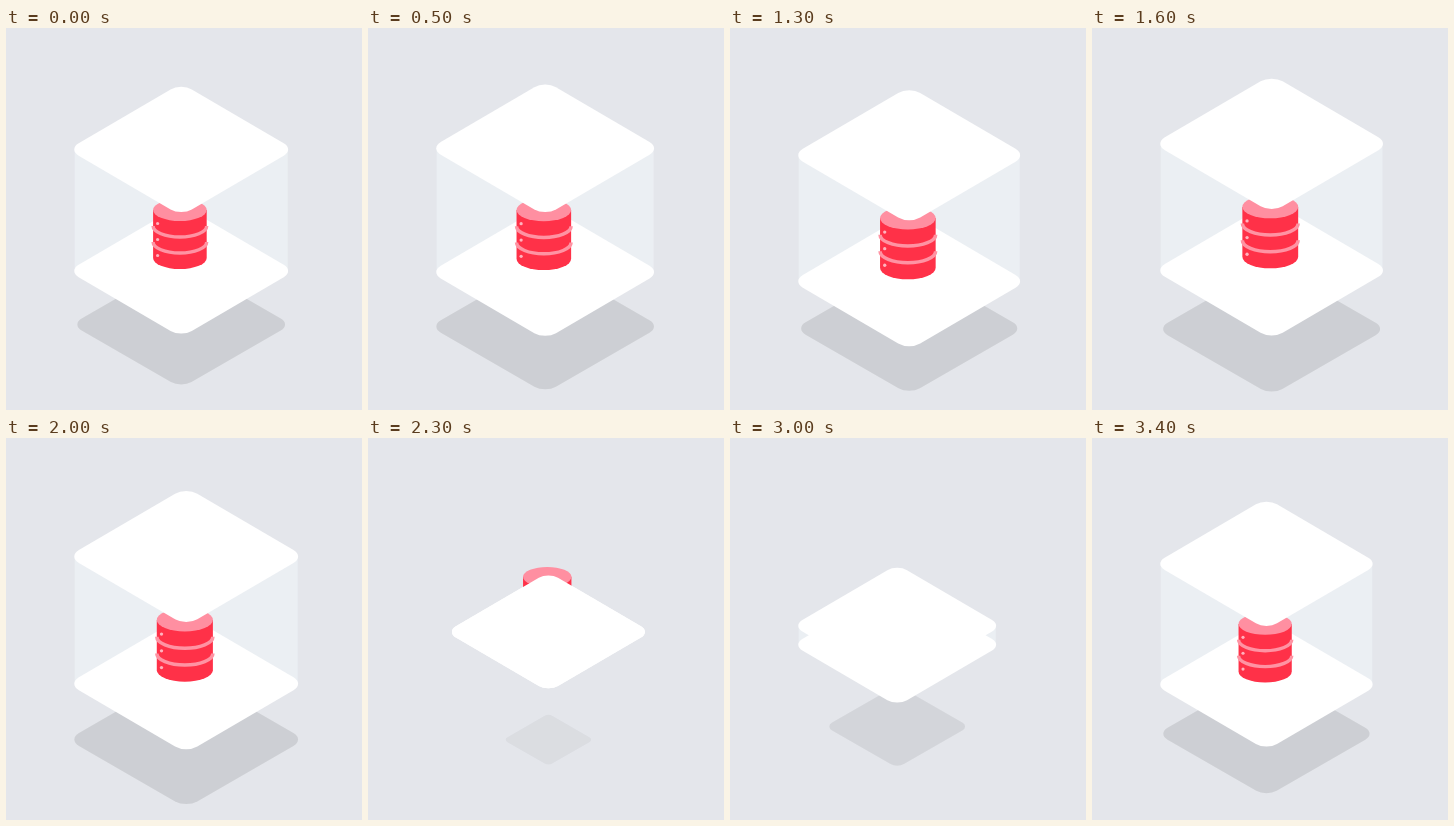
Animation of 356 by 382 pixels, one loop 3500 ms. Source, as an HTML page:

```html
<!DOCTYPE html>
<html lang="en">
<head>
<meta charset="utf-8">
<title>Data cube</title>
<style>
  html, body { margin: 0; width: 100%; height: 100%; overflow: hidden; background: #e4e6eb; }
  svg { display: block; width: 100%; height: 100%; }
</style>
</head>
<body>
<svg viewBox="0 0 356 382">
  <defs>
    <!-- rounded square, 214 wide once turned by 45 degrees -->
    <rect id="tile" x="-80" y="-80" width="160" height="160" rx="15" transform="rotate(45)"/>
  </defs>
  <g id="shadow"><use href="#tile" transform="scale(1 .577)"/></g>
  <g id="cube">
    <rect id="glass" x="-106.5" width="213" fill="#ebeff3"/>
    <g id="lower">
      <use href="#tile" transform="scale(1 .585)" fill="#fff"/>
      <g id="drum" transform="translate(-1.3 0)"></g>
    </g>
    <g id="upper"><use href="#tile" transform="scale(1 .585)" fill="#fff"/></g>
  </g>
</svg>
<script>
const LOOP = 3500, STEP = 100, BORN = 2700;
const WIDTH = 214, LEFT = 68.2;
// camera width over time, counted from the moment the cube is born
const ZOOM = [[2700, 180], [3000, 198], [3400, 212.5], [3500, 214], [4100, 218.7],
              [4400, 220.5], [4800, 222], [5500, 224], [6200, 225]];

const el = id => document.getElementById(id);
const put = (id, x, y, k = 1) => el(id).setAttribute('transform', `translate(${x} ${y}) scale(${k})`);
const part = (t, from, to) => Math.min(1, Math.max(0, (t - from) / (to - from)));
const smooth = p => p * p * (3 - 2 * p);
const easeOut = p => 1 - (1 - p) ** 2;
const wave = (t, peak) => Math.cos((t - peak) / 1500 * 2 * Math.PI);

function track(keys, t) {
  const i = Math.max(1, keys.findIndex(k => k[0] >= t));
  const [a, b] = [keys[i - 1], keys[i]];
  return a[1] + (b[1] - a[1]) * part(t, a[0], b[0]);
}

function buildDrum() {
  const rx = 26.8, ry = 11, foot = -13, pitch = 16, top = foot - 3 * pitch;
  const rim = y => `M${-rx} ${y}A${rx} ${ry} 0 0 0 ${rx} ${y}`;
  let out = `<path d="${rim(foot)}V${top}H${-rx}Z" fill="#ff3148"/>
    <ellipse cy="${top}" rx="${rx}" ry="${ry}" fill="#ff8fa1"/>`;
  for (let i = 0; i < 3; i++) {
    const y = foot - i * pitch;
    if (i) out += `<path d="${rim(y)}" fill="none" stroke="#ff93a3" stroke-width="3.4"/>`;
    out += `<circle cx="-22.3" cy="${y - 2.5}" r="1.6" fill="#ffb3be"/>`;
  }
  el('drum').innerHTML = out;
}

function draw(t) {
  const u = t < BORN ? t + LOOP : t;
  const opening = t >= BORN;
  const w = track(ZOOM, u), zoom = w / WIDTH, cx = LEFT + w / 2;

  const size = opening ? easeOut(part(t, 2700, 3000)) : 1 - part(t, 2050, 2600) ** 2.5;
  const open = opening ? smooth(part(t, 2880, 3340)) : 1 - smooth(part(t, 2000, 2300));
  const cast = opening ? easeOut(part(t, 2800, 3250)) : 1 - part(t, 2000, 2400) ** 1.66;

  const cy = 187.2 + 10 * wave(u - LOOP, 1000);
  const half = 0.568 * WIDTH * open / 2;
  put('cube', cx, cy, zoom * size);
  put('upper', 0, -half);
  put('lower', 0, half);
  el('glass').setAttribute('y', -half);
  el('glass').setAttribute('height', 2 * half);

  const breath = 0.988 + 0.017 * wave(u - LOOP, 700);
  put('shadow', cx, 296.5 + (w - WIDTH) / 2, zoom * cast * breath);
  el('shadow').setAttribute('opacity', 0.095 * cast);
}

buildDrum();
const start = performance.now();
function tick() {
  const t = (performance.now() - start) % LOOP;
  draw(Math.floor(t / STEP) * STEP);
  requestAnimationFrame(tick);
}
tick();
</script>
</body>
</html>
```
